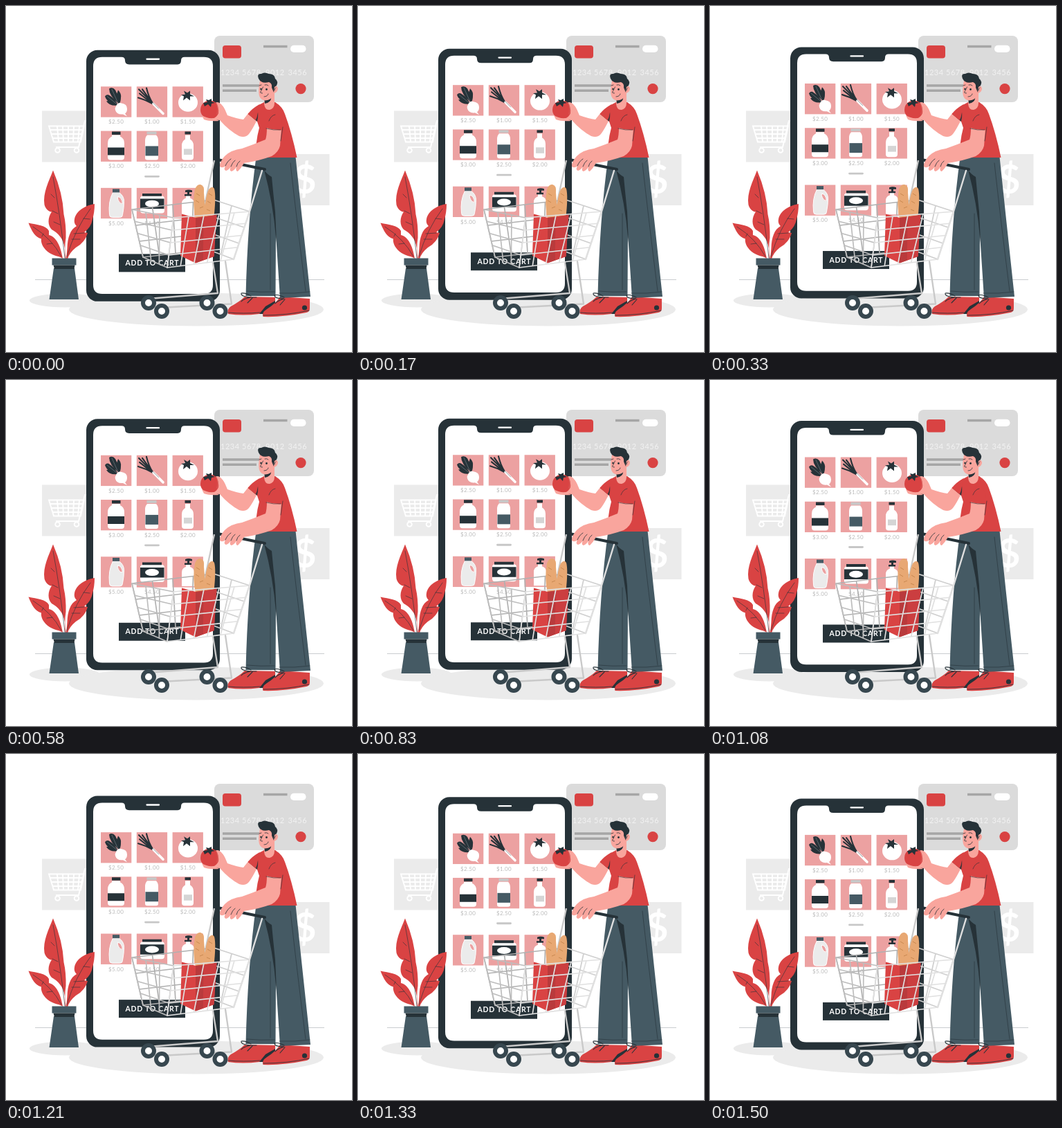
An HTML page for the animation above (1.54 s loop, 500 px wide and 500 px high).

```html
<!DOCTYPE html>
<html lang="en">
<head>
<meta charset="utf-8">
<title>Online groceries</title>
<style>
  html, body { margin: 0; width: 100%; height: 100%; overflow: hidden; background: #fff; }
  svg { display: block; width: 100vw; height: 100vh; }
  text { font-family: Lato, sans-serif; }
  .red { fill: #d94343; } .dark { fill: #263238; } .slate { fill: #455a64; }
  .skin { fill: #f9a59d; } .white { fill: #fff; } .pale { fill: #ebebeb; } .pink { fill: #eca1a1; }
  .line { fill: none; stroke: #263238; stroke-width: .8; stroke-linecap: round; stroke-linejoin: round; }
  .thin { stroke-width: .6; }
  .wire { fill: none; stroke-width: 1.7; stroke-linecap: round; stroke-linejoin: round; }
  .price { font-size: 8px; letter-spacing: .35px; fill: #bcbcbc; text-anchor: middle; }
</style>
</head>
<body>
<svg viewBox="0 0 500 500">
  <!-- backdrop -->
  <g>
    <path class="pale" d="M52 151.500h74v74H52zM393.500 214h74v74h-74z"/>
    <g fill="none" stroke="#fff" stroke-width="1.900">
      <path d="M62 173.500h51l-5 23H69zM64 179h48M65.500 185h45M67 191h42M74 174l2 22M82 174l1 22M90 174v22M98 174l-1 22M106 174l-2 22M117 166h-3l-9 38H72"/>
      <circle cx="74.500" cy="208.500" r="3.300"/><circle cx="102" cy="208.500" r="3.300"/>
    </g>
    <text x="432" y="271" font-size="57" font-weight="700" fill="#fff" text-anchor="middle">$</text>
    <rect x="301" y="43" width="144" height="96" rx="8" fill="#dbdbdb"/>
    <rect class="red" x="313" y="57" width="27" height="18.500" rx="4"/>
    <rect class="white" x="411" y="56.700" width="22.500" height="10.300" rx="5.100"/>
    <path d="M372 58.500h34.500M313 115h53M313 122.300h49" stroke="#a6a6a6" stroke-width="3.400"/>
    <g font-size="11" fill="#f2f2f2" letter-spacing=".5">
      <text x="310" y="100">1234</text><text x="341" y="100">5678</text>
      <text x="375" y="100">9012</text><text x="407.500" y="100">3456</text>
    </g>
    <circle class="red" cx="426" cy="119.600" r="7.600"/>
    <path d="M42 395.300h418" stroke="#263238" stroke-width=".6" opacity=".5"/>
    <ellipse class="pale" cx="85" cy="425.500" rx="51" ry="10"/>
    <ellipse class="pale" cx="275" cy="438.500" rx="184" ry="24"/>
  </g>

  <g id="phone">
    <rect class="dark" x="116" y="64.400" width="193" height="363" rx="16"/>
    <path class="white" d="M139 74.400h28q5 0 5 5 0 5.600 6 5.600h70q5 0 5-5.600 0-5 5-5h28q13 0 13 13v316.200q0 13-13 13H139q-13 0-13-13V87.400q0-13 13-13z"/>
    <path d="M203.500 77.300h17.500" stroke="#fff" stroke-width="2.300" stroke-linecap="round"/>
    <g id="tiles"></g>
    <path d="M201.500 246.900h19" stroke="#c7c7c7" stroke-width="2.800" stroke-linecap="round"/>
    <!-- beet, leek, tomato -->
    <g class="dark">
      <path d="M162 144Q146 141 143 131 146 127 150 130 157 134 162 144zM163 142Q149 130 149 120 154 117 158 122 163 131 163 142zM163 143Q158 130 162 122 167 127 166 133 166 139 163 143zM162 144Q150 146 145 138 153 136 162 144z"/>
    </g>
    <path class="line thin" d="M146 131l15 12M153 121l9 20" style="stroke:#7d898f"/>
    <path class="white" d="M159 145q3-6 8-4 8 1 8 8 0 5-3 7l3 4-6-3q-9 1-11-6-1-4 1-5z"/>
    <path class="line" d="M192 121q9 9 22 22M197 121q7 10 15 20M203 119q3 13 9 22M193 127q10 8 19 15M191 133q11 3 21 9" style="stroke-width:2.100"/>
    <path d="M213 142l14 14" stroke="#fff" stroke-width="3.600" stroke-linecap="round"/>
    <path d="M212 140l9 9" stroke="#7d898f" stroke-width=".8"/>
    <ellipse class="white" cx="263" cy="140" rx="14" ry="13.300"/>
    <path class="dark" d="M253 129l6-1-2-5 5 3 4-3 0 5 6 3-6 0 0 6-5-4-5 4 1-6z"/>
    <!-- bottles -->
    <path class="white" d="M153 187h12v2q6 3 6 10v20q0 4-4 4h-16q-4 0-4-4v-20q0-7 6-10z"/>
    <path class="dark" d="M153 182h12.500v4.500H153zM147 205h24v11h-24z"/>
    <path class="white" d="M204 187h13q3 3 3 8v25q0 3-3 3h-13q-3 0-3-3v-25q0-5 3-8z"/>
    <path d="M203.500 182h14v4h-14z" fill="#c7c7c7"/>
    <path class="slate" d="M201.500 203h18.500v14h-18.500z"/>
    <path class="white" d="M259 187h7v6q5 3 5 9v17q0 4-4 4h-9q-4 0-4-4v-17q0-6 5-9z"/>
    <path class="dark" d="M258.500 182h8.500v4h-8.500z"/>
    <path d="M257 207h12v8.500h-12z" fill="#d5d5d5"/>
    <!-- detergent, jar, pump -->
    <path d="M154.500 270h9q7 5 7 13 0 9-2 19 0 4-4 4h-11q-4 0-4-4-2-19 5-32z" fill="#ebebeb" stroke="#fff"/>
    <path class="pink" d="M161.500 276q6 1 7 10-4 1-6-4-2-4-1-6z" stroke="#fff"/>
    <path class="slate" d="M154 265h10v5h-10z"/>
    <rect class="white" x="194" y="275" width="35" height="25" rx="4"/>
    <path class="dark" d="M197 271.500h28v3.800h-28zM194 279h34.500v14.500H194z"/>
    <ellipse class="white" cx="211" cy="286.200" rx="10" ry="5"/>
    <path class="white" d="M260 274h6v4q6 2 6 8v20h-18v-20q0-6 6-8z"/>
    <path class="dark" d="M259 267q5-2 10 0v2.500h-4v3h3v2.500h-10v-2.500h4v-3h-3z"/>
    <rect class="dark" x="163" y="358.900" width="96" height="26"/>
    <text x="211.400" y="375.600" font-size="10.500" font-weight="700" letter-spacing=".75" fill="#fff" text-anchor="middle">ADD TO CART</text>
  </g>

  <!-- plant -->
  <g>
    <path class="red" d="M68 237.500C62 253 53 270 55.500 287 57 293 61 297 66 297.500 60 306 60 317 66 323 75 328 83 336 85 350L85.500 366H87Q84 350 86.500 335 87 316 83.500 301 82 270 68 237.500z"/>
    <path class="red" d="M128 286C115 288 101 296 99 308 98 313 100 316 102 318 93 323 89 334 88.500 350L87 366H89Q91 357 101 349 114 342 118 328L113 327Q123 320 125 308 128 298 128 286z"/>
    <path class="red" d="M32.500 313.500C45 316 58 317 62 325L62 331C72 333 79 346 82 365 77 361 71 362 63 357 54 351 50 343 51 336.500 42 334 37 325 32.500 313.500z"/>
    <path class="line thin" d="M68 247Q78 300 85 364M70 277l-5-5M75 300l-8-4M78 316l-9-4M122 293Q100 322 88 362M112 307l9 1M98 329l15-1M95 337l12 0M39 319Q66 336 80 362M54 329l-2 4M67 343l-8 1"/>
    <path class="slate" d="M66.500 364.500h35v10h-35zM69 379h30l6 45H62.500z"/>
    <path class="dark" d="M68.500 374.500h31l-1 5.500H70z"/>
  </g>

  <!-- trolley, rear half -->
  <g>
    <path class="wire" d="M301 223L286 292M299 371L306 415 206 423M317 369L326 430.500 222 436" stroke="#c9c9c9" style="stroke-width:2.300"/>
    <g id="rear"></g>
    <g id="wheels"></g>
  </g>

  <!-- groceries -->
  <g>
    <path d="M274 309Q269 285 273 265 276 257 281 258 287 259 286 270L289 309zM285 309Q288 275 293 265 298 259 301 264 304 275 300 309z" fill="#e8a873"/>
    <path d="M275 271l5 3M274 281l5 3M280 292l5-2M293 271l5 3M291 282l5 3M290 294l5 2" stroke="#c98951" stroke-width="1"/>
    <path class="red" d="M254 300.500L274 306 304.500 302 300.500 362 274 371.500 252 361z"/>
    <path d="M274 306L286 304.500 285 367.500 274 371.500z" fill="#b93a3c"/>
    <path d="M286 304.500l18.500-2.500-4 60-15.500 5.500z" fill="#cb3e40"/>
  </g>

  <!-- shopper -->
  <g>
    <path class="red" d="M345 420Q338 427 325 434 319 438 321 445 342 448 366 445L389 432V421z"/>
    <path class="dark" d="M366 445l9-11 14-8v7l-17 12z"/>
    <path class="red" d="M396 420Q391 429 377 438 369 443 371.500 449 400 450 434 443 439 442 439 437V423z"/>
    <circle class="dark" cx="431.500" cy="436" r="3.600"/>
    <path class="line" d="M321 443q22 2 46 0M372 447q35 0 66-7"/>
    <path class="slate" d="M361.500 218h57Q426 290 440 420l-44 2L390 330 389.500 419H346.500Q349 310 361.500 218z"/>
    <path class="dark" d="M373 237q4 6 11 10 2 22 5 50l2 45-1-8Q386 285 373 237z"/>
    <path class="line thin" d="M348 412q20 2 40 1M395 415q22 1 44-2M411 227Q419 300 433 412M382 300L382 410"/>
    <path class="line" d="M354 419q-8-5-14-4-1 5 14 6-11 2-14 6M356 422l-7 7M362 421l-13 0M402 421q-9-5-14-3 0 5 14 5-10 3-13 7M403 424l-7 8" style="stroke-width:1.100"/>
    <!-- raised arm -->
    <path class="skin" d="M363 164Q357 177 351 185 346 191 337 188 322 180 309 165 300 164 290 164 283 162 284 155L303 158 306 149Q300 142 304 139 311 139 317 151L320 158Q334 163 343 164L351 154z"/>
    <circle class="red" cx="294.500" cy="150" r="13.500"/>
    <path class="dark" d="M285 140l6-1-2-4 4 1 4-2 0 4 5 2-5 1-1 5-4-4-5 3z"/>
    <path class="skin" d="M304 139q6-1 12 10l3 11-14 2q5-10-1-23zM283 158q8 5 17 4l8 4q-14 1-22-2z"/>
    <path class="line thin" d="M304 140q4 9 1 16" style="stroke:#d97b74"/>
    <!-- torso -->
    <path class="red" d="M373 139Q358 146 350 156L363 167 366 176Q360 198 361.500 219H420.500Q413 183 403 156 400 146 389 139z"/>
    <path class="dark" d="M350 156l12-10q4 8 1 21z" opacity=".85"/>
    <path class="red" d="M349.500 156q6-8 17-14l-4 19-2 4z"/>
    <path class="skin" d="M374 133L373 141Q374 151 381 150 388 148 388 140L388 126z"/>
    <path class="dark" d="M373.500 136q7 0 10-4-1 8-9.500 9z"/>
    <!-- head -->
    <path class="skin" d="M367 108Q364 122 366 130 369 138 378 136 385 134 388 126 393 124 393 119 392 114 387 116L386 106z"/>
    <path class="dark" d="M365 105Q362 97 369 98 373 95 380 98 388 98 389 105 394 109 391 115L388 117 387 125 384 118Q385 112 380 110 369 113 365 105z"/>
    <path class="line" d="M371.500 117q-3 6-4 8 1 1 3 1M373 131q5 0 6-4M366 115l3-1M374 114q3-1 5 1M390 118q-2 1-2 4"/>
    <circle class="dark" cx="368.500" cy="120" r="1.300"/><circle class="dark" cx="376.500" cy="120.500" r="1.400"/>
    <!-- handle and near arm -->
    <path d="M301 221L374 236" stroke="#263238" stroke-width="4" stroke-linecap="round"/>
    <path class="skin" d="M377 176Q377 187 375 193 358 200 341 206 325 208 316 217 308 226 309 232 313 235 317 231 314 237 318 238 322 237 325 232 322 238 326 239 331 237 333 232 331 239 335 239 340 234 344 227 365 224 384 217 394 211 396 202L398 178z"/>
    <path class="red" d="M376 176Q379 159 390 153 400 158 399 179 388 180 376 176z"/>
    <path class="line thin" d="M376 177q11 3 21 2M380 166Q383 158 389 157M400 175L397 195"/>
    <path class="line" d="M317 231q3-7 8-10M325 232q2-6 6-9M333 232q1-5 5-8"/>
  </g>
  <g id="front"></g>
</svg>
<script>
  const el = id => document.getElementById(id);
  const mix = (p, q, k) => [p[0] + (q[0] - p[0]) * k, p[1] + (q[1] - p[1]) * k];

  // Wire mesh spanning the quad: top left, top right, bottom left, bottom right
  function mesh(tl, tr, bl, br, cols, rows, color) {
    let d = '';
    for (let i = 0; i <= cols; i++) d += `M${mix(tl, tr, i / cols)}L${mix(bl, br, i / cols)}`;
    for (let j = 0; j <= rows; j++) d += `M${mix(tl, bl, j / rows)}L${mix(tr, br, j / rows)}`;
    return `<path class="wire" stroke="${color}" d="${d}"/>`;
  }

  const prices = [['2.50', '1.00', '1.50'], ['3.00', '2.50', '2.00'], ['5.00', '4.50', '']];
  const rowTops = [116.9, 181.1, 263.4];
  el('tiles').innerHTML = prices.map((row, r) => row.map((price, c) => {
    const x = 137 + 51.8 * c, y = rowTops[r];
    return `<rect class="pink" x="${x}" y="${y}" width="44.3" height="44.3"/>` +
      (price && `<text class="price" x="${x + 22.2}" y="${y + 53.9}">$${price}</text>`);
  }).join('')).join('');

  const left = [182, 294], corner = [242, 306], right = [352, 297], back = [300, 280];
  const leftLow = [198, 363], cornerLow = [233, 378], rightLow = [329, 366], backLow = [292, 352];
  el('rear').innerHTML = mesh(left, back, leftLow, backLow, 4, 3, '#b0b0b0') +
    mesh(back, right, backLow, rightLow, 2, 3, '#cfcfcf');
  el('front').innerHTML = mesh(left, corner, leftLow, cornerLow, 3, 4, '#bdbdbd') +
    mesh(corner, right, cornerLow, rightLow, 5, 4, '#e0e0e0') +
    '<path class="wire" stroke="#e0e0e0" style="stroke-width:2.4" d="M370 238L352 297 329 366"/>';
  el('wheels').innerHTML = [[206, 429], [225, 441], [290.5, 429], [309.5, 441]].map(([x, y]) =>
    `<circle cx="${x}" cy="${y}" r="8" fill="#fff" stroke="#37474f" stroke-width="6"/>`).join('');

  // The phone floats up 10 px and back at constant speed, in 37 film steps
  const LOOP = 1540, STEPS = 37;
  function draw(now) {
    const step = Math.floor(((now % LOOP) + 4) * STEPS / LOOP);
    const phase = (step + 1) / STEPS % 1;
    const lift = 10 * (1 - Math.abs(1 - 2 * phase));
    el('phone').setAttribute('transform', `translate(0 ${-lift})`);
    requestAnimationFrame(() => draw(performance.now() - start));
  }
  const start = performance.now();
  draw(0);
</script>
</body>
</html>
```
